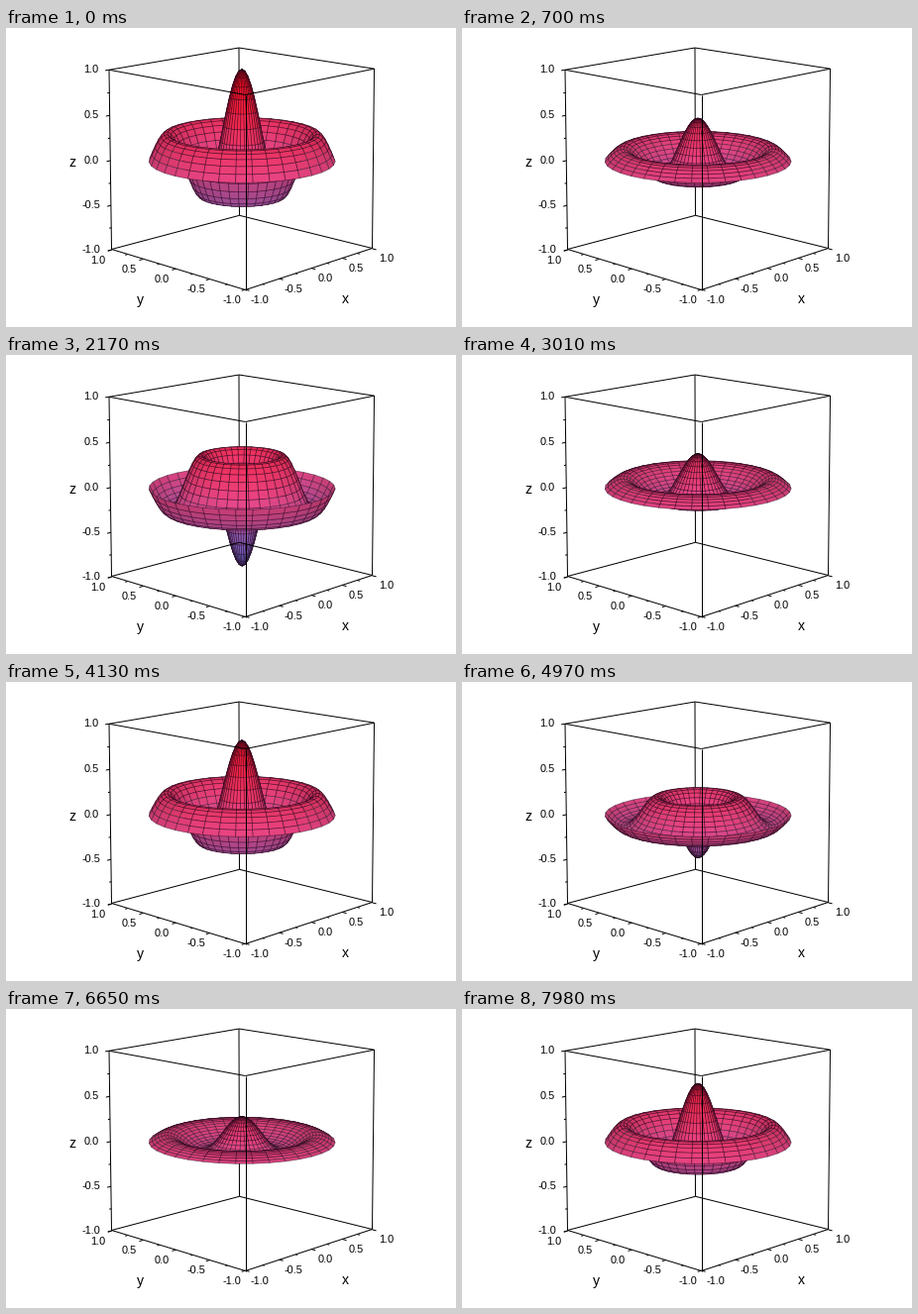
A matplotlib script for the animation above (8000 ms loop, 454 by 302 pixels).

```python
import itertools

import matplotlib.pyplot as plt
import numpy as np
from matplotlib.animation import FuncAnimation
from matplotlib.collections import LineCollection, PolyCollection

W, H, DPI = 454, 302, 100
PX = 72 / DPI
LOOP, TICK = 8000, 20
FIRST_HOLD, HOLD, CYCLE = 280, 210, 16
CYCLE_MS = FIRST_HOLD + (CYCLE - 1) * HOLD
K = 8.6537                     # third zero of J0
PHASE_STEP = K * 0.042
RINGS, SPOKES = 30, 36

# Screen positions of the cube corners, keyed by (x, y, z)
CORNERS = {
    (-1, -1, -1): (241.5, 264.5), (-1, -1, 1): (241.5, 67.5),
    (1, -1, -1): (369.5, 222.5), (1, -1, 1): (371.5, 41.2),
    (-1, 1, -1): (106.5, 223.5), (-1, 1, 1): (104.0, 42.3),
    (1, 1, -1): (235.5, 189.3), (1, 1, 1): (235.0, 20.0),
}
CENTER, SCALE = np.array([W / 2, H / 2]), 100


def fit_camera():
    """Least-squares perspective matrix through the cube corners."""
    rows = []
    for corner, pixel in CORNERS.items():
        p = np.array([*corner, 1.0])
        u, v = (np.array(pixel) - CENTER) / SCALE
        rows += [np.r_[p, np.zeros(4), -u * p], np.r_[np.zeros(4), p, -v * p]]
    return np.linalg.svd(np.array(rows))[2][-1].reshape(3, 4)


CAMERA = fit_camera()


def project(points):
    points = np.asarray(points, float)
    q = points @ CAMERA[:, :3].T + CAMERA[:, 3]
    return q[..., :2] / q[..., 2:] * SCALE + CENTER


def bessel(order, x):
    a = (np.arange(64) + 0.5) * np.pi / 64
    return np.cos(order * a - np.asarray(x)[..., None] * np.sin(a)).mean(-1)


r, angle = np.meshgrid(np.linspace(0, 1, RINGS + 1),
                       np.linspace(0, 2 * np.pi, SPOKES + 1), indexing="ij")
X, Y, SHAPE = r * np.cos(angle), r * np.sin(angle), bessel(0, K * r)
r_mid = (r[:-1, :-1] + r[1:, 1:]) / 2
a_mid = (angle[:-1, :-1] + angle[1:, 1:]) / 2
SLOPE = -K * bessel(1, K * r_mid)

ELEVATION = np.radians(13.4)
VIEW = np.array([-np.cos(ELEVATION) / 2 ** 0.5,
                 -np.cos(ELEVATION) / 2 ** 0.5, np.sin(ELEVATION)])
LEVELS = [-1, 0, 1]
RAMP = np.array([[82, 112, 222], [212, 64, 122], [238, 4, 12]]) / 255


def cells(grid):
    return np.stack([grid[:-1, :-1], grid[1:, :-1],
                     grid[1:, 1:], grid[:-1, 1:]], axis=2)


def surface(amplitude):
    """Projected cells with their colours, farthest first."""
    quads = cells(np.stack([X, Y, amplitude * SHAPE], axis=-1)).reshape(-1, 4, 3)
    mid = quads.mean(axis=1)
    slope = amplitude * SLOPE
    normal = np.stack([-slope * np.cos(a_mid), -slope * np.sin(a_mid),
                       np.ones_like(slope)], axis=-1)
    normal /= np.linalg.norm(normal, axis=-1, keepdims=True)
    facing = (normal @ VIEW).ravel()
    shade = np.where(facing > 0, 0.86, 0.76) + 0.24 * np.abs(facing)
    color = np.stack([np.interp(mid[:, 2], LEVELS, c) for c in RAMP.T], axis=1)
    color = np.clip(color * shade[:, None], 0, 1)
    order = np.argsort(mid @ VIEW)
    return project(quads)[order], color[order]


fig = plt.figure(figsize=(W / DPI, H / DPI), dpi=DPI, facecolor="white")
ax = fig.add_axes([0, 0, 1, 1])
ax.set(xlim=(0, W), ylim=(H, 0))
ax.axis("off")


def add_lines(segments, zorder):
    ax.add_collection(LineCollection(segments, colors="black",
                                     linewidths=PX, zorder=zorder))


def add_text(x, y, text, size=11, ha="center"):
    ax.text(x, y, text, fontsize=size * PX, family="Liberation Sans",
            ha=ha, va="center")


def draw_box():
    for a, b in itertools.combinations(CORNERS, 2):
        if sum(i != j for i, j in zip(a, b)) == 1:
            behind = a[:2] == b[:2] == (1, 1)
            add_lines([[CORNERS[a], CORNERS[b]]], 1 if behind else 3)


def draw_axes():
    ticks = []
    for i, value in enumerate(np.linspace(-1, 1, 9)):
        major = i % 2 == 0
        out = -1.055 if major else -1.03
        on_x, on_y, on_z = (value, -1, -1), (-1, value, -1), (-1, 1, value)
        ticks += [project([on_x, (value, out, -1)]),
                  project([on_y, (out, value, -1)]),
                  project([on_z, (out, 1, value)])]
        if major:
            label = f"{value:.1f}"
            x, y = project(on_x)
            add_text(x + 14, y + 10.5, label)
            x, y = project(on_y)
            add_text(x - 14, y + 10.5, label)
            x, y = project(on_z)
            add_text(x - 11, y, label, ha="right")
    add_lines(ticks, 3)
    for x, y, name in [(66.5, 136, "z"), (135.5, 275, "y"), (342.5, 273.5, "x")]:
        add_text(x, y, name, size=14)


draw_box()
draw_axes()
mesh = PolyCollection([], linewidths=0.75 * PX, zorder=2,
                      edgecolors=(0.12, 0.02, 0.1, 0.5))
ax.add_collection(mesh, autolim=False)


def step_at(ms):
    cycle, rest = divmod(ms, CYCLE_MS)
    return cycle * CYCLE + max(0, (rest - FIRST_HOLD) // HOLD + 1)


def update(frame):
    step = step_at(frame * TICK + TICK // 2)
    verts, colors = surface(np.cos(PHASE_STEP * step))
    mesh.set_verts(verts)
    mesh.set_facecolor(colors)
    return [mesh]


animation = FuncAnimation(fig, update, frames=LOOP // TICK, interval=TICK,
                          repeat=True, repeat_delay=0)
plt.show()
```
